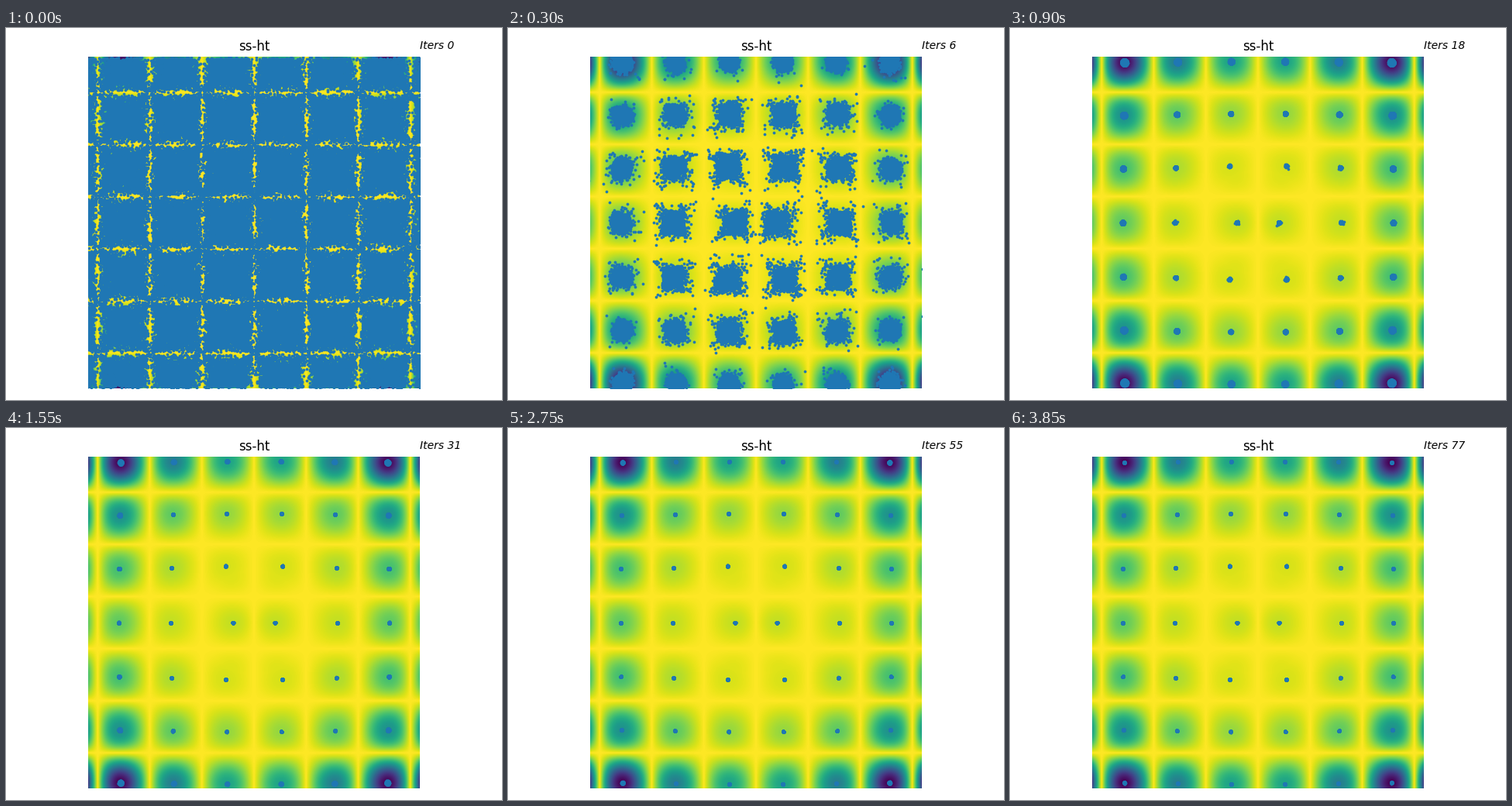
Write a matplotlib script that moves like this. It is 640 px wide and 480 px high and loops after 3.9 s.

```python
import numpy as np
import matplotlib.pyplot as plt
from matplotlib.animation import FuncAnimation

W, H, DPI = 640, 480, 100
FRAMES, INTERVAL = 78, 50
SIDE = 427.67               # side of the square plot in pixels
PX = 20 / SIDE              # one pixel in data units
GRID = 320                  # particles per side at the start
SETTLED, THIN = 22, 8       # later frames draw only every eighth particle


def holder_table(x, y):
    r = np.hypot(x, y)
    return -np.abs(np.sin(x) * np.cos(y) * np.exp(np.abs(1 - r / np.pi)))


def valley_shift(cx, cy):
    """Offset of each true minimum from the centre of its cell."""
    dx, dy = np.zeros_like(cx), np.zeros_like(cy)
    for _ in range(4):
        x, y = cx + dx, cy + dy
        r = np.hypot(x, y)
        pull = np.sign(r - np.pi) / (np.pi * r)
        dx, dy = np.arctan(x * pull), np.arctan(y * pull)
    return dx, dy


def spread(k, strength):
    """Radius of the disc kept around a minimum, in data units."""
    size = 4 * (1 - np.exp(-strength / 8))
    fade = np.exp((18 - max(k, 12)) / (6 + 1.6 * strength))
    return np.maximum(size * fade, 0.6) * PX


def simulate():
    rng = np.random.default_rng(7)
    side = np.arange(GRID)
    pts = np.stack(np.meshgrid(side, side), -1).reshape(-1, 2)
    pts = (pts + rng.random(pts.shape)) * 20 / GRID - 10
    rng.shuffle(pts)
    x, y = pts.T

    cx = (np.floor(x / np.pi) + 0.5) * np.pi
    cy = np.round(y / np.pi) * np.pi
    u, v = x - cx, y - cy
    dx, dy = valley_shift(cx, cy)
    strength = np.exp(np.abs(1 - np.hypot(cx + dx, cy + dy) / np.pi))
    rate = np.minimum(0.22 + 0.025 * strength, 0.45)

    angle = rng.uniform(0, 2 * np.pi, x.size)
    radius = np.sqrt(rng.random(x.size))
    jx, jy = radius * np.cos(angle), radius * np.sin(angle)
    nx, ny = rng.normal(0, 4 * PX, (2, x.size))

    steps = []
    for k in range(FRAMES):
        # noisy descent inside each cell, slow near its corners
        gu = np.sin(u) * (np.cos(v) + 0.1)
        gv = np.sin(v) * (np.cos(u) + 0.1)
        u = u - rate * gu * rng.uniform(0, 2, u.size)
        v = v - rate * gv * rng.uniform(0, 2, v.size)

        ramp = min(1, k / 6)
        disc = spread(k, strength)
        haze = min(1, np.exp((6 - k) / 4))
        px = cx + u + ramp * (dx * np.cos(u) + disc * jx + haze * nx)
        py = cy + v + ramp * (dy * np.cos(v) + disc * jy + haze * ny)
        thin = THIN if k >= SETTLED else 1
        steps.append((px[::thin], py[::thin]))
    return steps


fig = plt.figure(figsize=(W / DPI, H / DPI), dpi=DPI)
ax = fig.add_axes(((W - SIDE) / 2 / W, 15 / H, SIDE / W, SIDE / H))
ax.axis("off")

axis = (np.arange(1000) + 0.5) / 50 - 10
ax.imshow(holder_table(*np.meshgrid(axis, axis)), extent=(-10, 10, -10, 10),
          origin="lower", cmap="viridis", aspect="auto")
ax.set_title("ss-ht", fontsize=12)
label = ax.text(1, 1.025, "", transform=ax.transAxes, style="italic", fontsize=10)
dots, = ax.plot([], [], "o", color="#1f77b4", ms=2.7, mew=0)
ax.set(xlim=(-10, 10), ylim=(-10, 10))

steps = simulate()


def update(k):
    dots.set_data(*steps[k])
    label.set_text(f"Iters {k}")
    return dots, label


anim = FuncAnimation(fig, update, frames=FRAMES, interval=INTERVAL,
                     repeat=True, repeat_delay=0)
plt.show()
```
